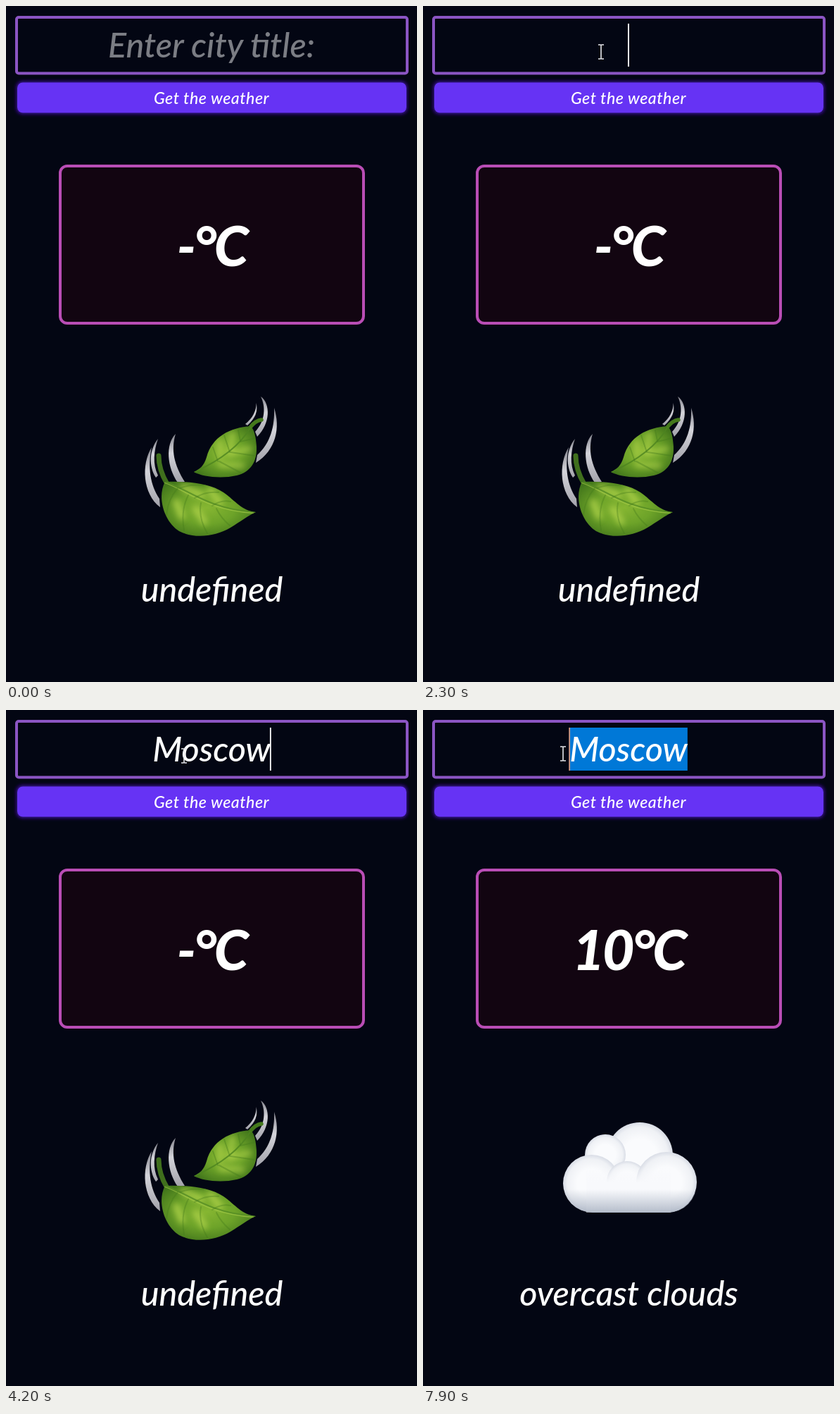
These frames come from a looping animation (584x959 px, 8000 ms). An HTML page:

```html
<!DOCTYPE html>
<html lang="en">
<head>
<meta charset="utf-8">
<title>Weather</title>
<style>
  html, body { margin: 0; width: 100%; height: 100%; overflow: hidden; background: #030613; }
  svg { display: block; width: 100vw; height: 100vh; }
  text { font: italic 500 48.5px Lato, Carlito, sans-serif; fill: #fff; text-anchor: middle; }
  #temp { font-size: 79px; font-weight: 800; letter-spacing: -3.5px; }
  #label { font-size: 23.2px; letter-spacing: .5px; }
  .vein { fill: none; stroke-linecap: round; }
</style>
</head>
<body>
<svg viewBox="0 0 584 959">
  <defs>
    <filter id="glow" x="-5%" y="-40%" width="110%" height="180%"><feGaussianBlur stdDeviation="2"/></filter>
    <filter id="soft" x="-30%" y="-30%" width="160%" height="160%"><feGaussianBlur stdDeviation="4"/></filter>
    <radialGradient id="leaf" cx=".48" cy=".48" r=".6">
      <stop offset="0" stop-color="#86b632"/><stop offset=".5" stop-color="#6da329"/><stop offset="1" stop-color="#42761b"/>
    </radialGradient>
    <linearGradient id="wind" x1="0" y1="0" x2="0" y2="1">
      <stop offset="0" stop-color="#85858e"/><stop offset=".4" stop-color="#d4d4da"/><stop offset="1" stop-color="#a2a2aa"/>
    </linearGradient>
    <radialGradient id="puff" cx=".5" cy=".5" r=".5">
      <stop offset=".5" stop-color="#fafbfd"/><stop offset=".85" stop-color="#eff1f5"/><stop offset="1" stop-color="#d9dde6"/>
    </radialGradient>
    <linearGradient id="fill" x1="0" y1="0" x2="0" y2="1">
      <stop offset="0" stop-color="#f8f9fc" stop-opacity="0"/><stop offset=".35" stop-color="#f8f9fc"/>
    </linearGradient>
    <linearGradient id="shade" x1="0" y1="0" x2="0" y2="1">
      <stop offset="0" stop-color="#b8c0ce" stop-opacity="0"/><stop offset="1" stop-color="#b4bcca"/>
    </linearGradient>
    <clipPath id="bigClip"><use href="#bigLeaf"/></clipPath>
    <clipPath id="smallClip"><use href="#smallLeaf"/></clipPath>
    <clipPath id="baseClip"><rect x="199" y="627" width="190.5" height="86" rx="42"/></clipPath>
  </defs>

  <rect width="584" height="959" fill="#030613"/>
  <rect x="15" y="16" width="555" height="79.5" rx="3" fill="#030613" stroke="#8b55c3" stroke-width="4"/>
  <rect id="selection" y="25" height="61" fill="#0078d7"/>
  <text id="city" x="292" y="73"></text>
  <rect id="caret" y="25" width="1.8" height="61"/>

  <rect id="halo" x="14" y="106" width="557" height="48" rx="9" filter="url(#glow)"/>
  <rect id="button" x="16" y="108.5" width="553" height="43" rx="8"/>
  <text id="label" x="292" y="138.5">Get the weather</text>

  <rect x="77" y="227" width="431" height="223" rx="10" fill="#120511" stroke="#b94db5" stroke-width="4"/>
  <text id="temp" x="292" y="368.5"></text>

  <g id="leaves">
    <g fill="url(#wind)">
      <path d="M355.500 563Q360 580 343 595L340 593Q356 580 355.500 563Z"/>
      <path d="M362 554C376 564 376 592 357 611L354 604C369 588 369 568 362 554Z"/>
      <path d="M381 570C390 598 384 630 355 648L357 637C376 620 382 596 381 570Z"/>
      <path d="M207 626C192 650 194 692 219 711L218 699C205 680 201 654 207 626Z"/>
      <path d="M216 614C203 630 203 654 213 669L216 666C208 650 210 631 216 614Z"/>
      <path d="M241 607C226 622 229 655 244 676L254 675C239 651 234 630 241 607Z"/>
    </g>
    <path class="vein" d="M363 587Q354 588 346 599" stroke="#44781c" stroke-width="5.500"/>
    <path id="smallLeaf" fill="url(#leaf)" d="M348 596C318 598 293 611 285 640C281 653 275 657 267 661C279 668 306 671 328 666C348 661 357 646 356 625C355 611 353 602 348 596Z"/>
    <g class="vein" clip-path="url(#smallClip)">
      <path d="M322 606L319 630M304 618L304 642M346 628L316 636M336 652L304 651" stroke="#bddb52" stroke-width="6" opacity=".7" filter="url(#soft)"/>
      <path d="M348 597Q326 635 268 661" stroke="#4d8420" stroke-width="2" opacity=".8"/>
      <path d="M333 617L330 602M318 633L310 609M301 646L294 626M333 618L354 613M319 633L353 638M303 646L335 663" stroke="#447a1c" stroke-width="2" opacity=".4"/>
    </g>
    <path class="vein" d="M217 638Q217 658 229 678" stroke="#406f1d" stroke-width="7"/>
    <path id="bigLeaf" fill="url(#leaf)" d="M226 675C254 674 288 676 309 690C326 702 335 716 355 718C342 724 334 731 319 740C297 753 267 756 246 745C225 732 214 697 226 675Z"/>
    <g class="vein" clip-path="url(#bigClip)">
      <path d="M252 683L278 694M290 687L304 704M242 704L250 724M270 714L282 732" stroke="#b9d94f" stroke-width="9" opacity=".75" filter="url(#soft)"/>
      <path d="M224 674C257 684 284 713 354 718" stroke="#568c25" stroke-width="2" opacity=".8"/>
      <path d="M224 676C256 686 283 715 352 719.500" stroke="#a3c948" stroke-width="1.300" opacity=".7"/>
      <path d="M247 684Q262 678 281 680M268 698Q284 688 302 690M293 709Q306 700 319 703M244 684Q230 700 228 722M259 694Q248 715 253 744M277 705Q273 726 286 748M299 713Q305 726 318 737" stroke="#447a1c" stroke-width="2" opacity=".35"/>
    </g>
  </g>

  <g id="cloud">
    <g fill="url(#puff)">
      <circle cx="308" cy="632" r="47"/>
      <circle cx="259" cy="631" r="29"/>
      <circle cx="239.500" cy="671.500" r="40.500"/>
      <circle cx="290" cy="669" r="29"/>
      <circle cx="346" cy="670" r="43"/>
    </g>
    <rect x="232" y="648" width="120" height="64.500" fill="url(#fill)"/>
    <rect x="199" y="680" width="191" height="33" fill="url(#shade)" clip-path="url(#baseClip)"/>
  </g>

  <text id="sky" x="292.500" y="845"></text>

  <path id="arrow" d="M0 0V21L5 16.500L8.500 24.500L12 23L8.500 15.500H15Z" fill="#fff" stroke="#10101c" stroke-width="1"/>
  <path id="beam" d="M-4 -10H-1Q0 -10 0 -9Q0 -10 1 -10H4M0 -9V9M-4 10H-1Q0 10 0 9Q0 10 1 10H4" fill="none" stroke="#e8e8ec" stroke-width="1.600"/>
</svg>
<script>
const LOOP = 8000, CITY = "Moscow";
const FOCUS = 1900, BLUR = 4900, RESULT = 6200, DRAG = 7400, BLINK = 530;
const KEYS = [3000, 3200, 3300, 3450, 3600, 3750];
const PATH = [
  [1500, 253, -30], [1800, 253, 65], [4500, 253, 65], [4800, 276, 120],
  [7100, 276, 120], [7400, 383, 62], [7850, 199, 62]
];
const el = Object.fromEntries([...document.querySelectorAll("[id]")].map(e => [e.id, e]));

function pointer(t) {
  const i = PATH.findIndex(p => p[0] > t);
  if (i < 1) return (i ? PATH[PATH.length - 1] : PATH[0]).slice(1);
  const [a, b] = [PATH[i - 1], PATH[i]];
  const u = (t - a[0]) / (b[0] - a[0]), k = u * u * (3 - 2 * u);
  return [a[1] + (b[1] - a[1]) * k, a[2] + (b[2] - a[2]) * k];
}

function set(node, attrs) {
  for (const name in attrs) node.setAttribute(name, attrs[name]);
}

function show(node, on) {
  node.style.display = on ? "" : "none";
}

function drawInput(t, x) {
  const typed = KEYS.filter(k => k <= t);
  const empty = t < FOCUS;
  const value = empty ? "Enter city title:" : CITY.slice(0, typed.length);
  el.city.textContent = value;
  el.city.style.fill = empty ? "#7b7d84" : "#fff";

  const width = value ? el.city.getComputedTextLength() : 0;
  const left = 292 - width / 2, right = left + width;
  let caretX = right;
  const dragging = t >= DRAG;
  if (dragging) {
    for (let i = CITY.length - 1; i >= 0; i--) {
      const start = el.city.getStartPositionOfChar(i).x;
      if ((start + caretX) / 2 < x) break;
      caretX = start;
    }
  }
  set(el.selection, { x: caretX, width: dragging ? right - caretX : 0 });

  const since = t - (dragging ? DRAG : typed[typed.length - 1] || FOCUS);
  const lit = Math.floor(since / BLINK) % 2 === 0;
  show(el.caret, dragging || (t >= FOCUS && t < BLUR && lit));
  set(el.caret, { x: caretX - 0.9, fill: dragging && caretX < right ? "#d39a86" : "#fff" });
}

function draw(t) {
  const [x, y] = pointer(t);
  drawInput(t, x);

  const hover = y > 106 && y < 154;
  const overInput = y > 14 && y < 98;
  set(el.button, { fill: hover ? "#28068a" : "#6633f4" });
  set(el.halo, { fill: hover ? "#28068a" : "#2d0878" });
  el.label.style.fill = hover ? "#bcb0da" : "#fff";

  const done = t >= RESULT;
  el.temp.textContent = done ? "10°C" : "-°C";
  el.sky.textContent = done ? "overcast clouds" : "undefined";
  show(el.leaves, !done);
  show(el.cloud, done);

  show(el.arrow, !overInput);
  show(el.beam, overInput);
  set(overInput ? el.beam : el.arrow, { transform: `translate(${x} ${y})` });
}

const begin = performance.now();
function tick() {
  draw((performance.now() - begin) % LOOP);
  requestAnimationFrame(tick);
}
tick();
</script>
</body>
</html>
```
